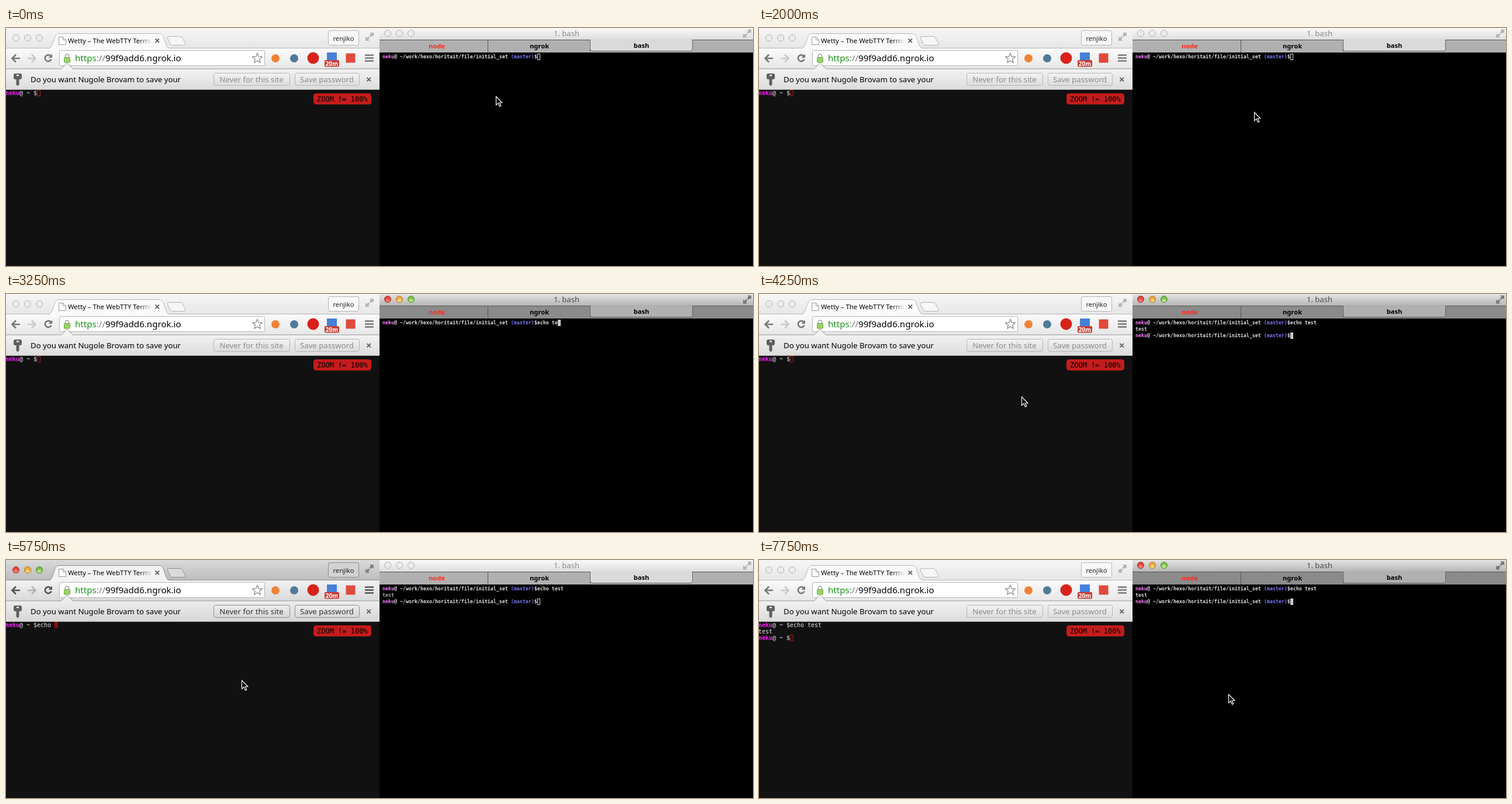
An HTML page that plays this animation: 1278 by 408 pixels, repeating every 8 s.

```html
<!DOCTYPE html>
<html lang="en">
<head>
<meta charset="utf-8">
<title>Shared terminal</title>
<style>
html, body { margin: 0; width: 100%; height: 100%; overflow: hidden; background: #000; }
svg { display: block; width: 100%; height: 100%; }
text { font-family: "Noto Sans", "Open Sans", sans-serif; white-space: pre; }
.mono { font-family: "DejaVu Sans Mono", monospace; }
.mid { text-anchor: middle; }
.tab { font-size: 11.2px; font-weight: 700; text-anchor: middle; }
.ask { font-size: 13.2px; font-weight: 500; }

#web { --s1: #f6f6f6; --s2: #e6e6e6; --b1: #fafafa; --b2: #e7e7e7; --i1: #f2f2f2; --i2: #dcdcdc;
  --ink: #8b8b8b; --icon: #777; --idle: #c9c9c9; --edge: #b5b5b5; --full: #b4b4b4; --name: #f7f7f7; }
#web.on { --s1: #dadada; --s2: #bcbcbc; --b1: #f2f2f2; --b2: #d9d9d9; --i1: #ededed; --i2: #d6d6d6;
  --ink: #333; --icon: #505050; --idle: #b4b4b4; --edge: #8e8e8e; --full: #808080; --name: #d2d2d2; }
#term { --s1: #f8f8f8; --s2: #dedede; --bar: #b0b0b0; --act: #dadada; --ink: #8a8a8a; --full: #b4b4b4; --out: #aaa; }
#term.on { --s1: #e4e4e4; --s2: #b5b5b5; --bar: #8b8b8b; --act: #b0b0b0; --ink: #484848; --full: #777; --out: #d4d4d4; }

.hi { stop-color: var(--s1); } .lo { stop-color: var(--s2); }
.bhi { stop-color: var(--b1); } .blo { stop-color: var(--b2); }
.ihi { stop-color: var(--i1); } .ilo { stop-color: var(--i2); }
.light { fill: #ececec; stroke: #b0b0b0; }
.on .red { fill: url(#gr); stroke: #a8342f; }
.on .amber { fill: url(#ga); stroke: #ad7a25; }
.on .green { fill: url(#gg); stroke: #52902f; }
.full { fill: var(--full); }
.btn { fill: url(#info); stroke: var(--edge); }
.line { fill: none; stroke: var(--icon); stroke-width: 2.6; }
#webText { font-size: 9.967px; fill: #e6e6e6; }
#termText { font-size: 8.305px; font-weight: 700; fill: #e0e0e0; }
</style>
</head>
<body>
<svg viewBox="0 0 1278 408" preserveAspectRatio="none">
<defs>
  <radialGradient id="gr" cy=".75"><stop stop-color="#ff8f86"/><stop offset="1" stop-color="#de4139"/></radialGradient>
  <radialGradient id="ga" cy=".75"><stop stop-color="#ffe488"/><stop offset="1" stop-color="#e9a63a"/></radialGradient>
  <radialGradient id="gg" cy=".75"><stop stop-color="#d2f59a"/><stop offset="1" stop-color="#79b94a"/></radialGradient>
  <path id="expand" d="M14 0V7L11.700 4.700 9 7.400 6.600 5 9.300 2.300 7 0ZM0 14V7L2.300 9.300 5 6.600 7.400 9 4.700 11.700 7 14Z"/>
  <clipPath id="tabClip"><rect x="100" y="10" width="149" height="25"/></clipPath>
</defs>

<g id="web">
  <defs>
    <linearGradient id="strip" x2="0" y2="1"><stop class="hi"/><stop class="lo" offset="1"/></linearGradient>
    <linearGradient id="bar" x2="0" y2="1"><stop class="bhi"/><stop class="blo" offset="1"/></linearGradient>
    <linearGradient id="info" x2="0" y2="1"><stop class="ihi"/><stop class="ilo" offset="1"/></linearGradient>
    <linearGradient id="fade"><stop class="bhi" stop-opacity="0"/><stop class="bhi" offset="1"/></linearGradient>
  </defs>
  <rect width="639" height="408" fill="#111"/>
  <rect width="639" height="35" fill="url(#strip)"/>
  <rect y="35" width="639" height="35" fill="url(#bar)"/>
  <path d="M0 34.500H73C78 34 79 29 84 15Q86 9.500 91 9.500H262Q267 9.500 269 15C274 29 275 34 280 34.500H639" fill="none" stroke="var(--edge)"/>
  <path d="M73 36C78 35 80 29 84.500 15Q86.500 10 91 10H262Q266.500 10 268.500 15C273 29 275 35 280 36Z" style="fill:var(--b1)"/>
  <path d="M278 14.500H298Q301 14.500 302 17L307 27Q308 29.500 305 29.500H285Q282 29.500 281 27L276 17Q275.500 14.500 278 14.500Z" style="fill:var(--s1);stroke:var(--edge)"/>
  <g class="light"><circle class="red" cx="17" cy="17" r="5.500"/><circle class="amber" cx="37" cy="17" r="5.500"/><circle class="green" cx="57" cy="17" r="5.500"/></g>
  <path d="M90.500 15.500H97.500L102.500 20.500V28.500H90.500ZM97.500 15.500V20.500H102.500" fill="#fff" stroke="#999"/>
  <text x="106" y="26" font-size="11.400" font-weight="500" clip-path="url(#tabClip)">Wetty – The WebTTY Terminal</text>
  <rect x="227" y="12" width="23" height="22" fill="url(#fade)"/>
  <path d="M255.500 18.500L262 25M262 18.500L255.500 25" stroke="#666" stroke-width="1.800"/>
  <rect x="551.500" y="4.500" width="52" height="25" rx="2.500" style="fill:var(--name);stroke:var(--edge)"/>
  <text class="mid" x="577.500" y="22" font-size="11.200" fill="#222">renjiko</text>
  <use href="#expand" class="full" x="615" y="8"/>

  <path class="line" d="M24 52H11M17 45.500L10.500 52 17 58.500"/>
  <path class="line" d="M37 52H50M44 45.500L50.500 52 44 58.500" style="stroke:var(--idle)"/>
  <path class="line" d="M76.500 48A5.500 5.500 0 1 0 77.500 53.500"/>
  <path d="M79 44.500V51H72.500Z" style="fill:var(--icon)"/>
  <rect x="91.500" y="38.500" width="351" height="26" rx="2" fill="#fff" stroke="#b5b5b5"/>
  <path d="M101.500 52V48.500A3 3.500 0 0 1 107.500 48.500V52" fill="none" stroke="#a5a5a5" stroke-width="1.700"/>
  <rect x="99.500" y="50.500" width="10" height="8.500" rx="1" fill="#9bd36b" stroke="#67a53b"/>
  <text x="118" y="57" font-size="15.100"><tspan fill="#169316">https</tspan><tspan fill="#777">://</tspan>99f9add6.ngrok.io</text>
  <path id="star" fill="#fff" stroke="#888" stroke-width="1.200"/>
  <circle cx="461" cy="52" r="7" fill="#ef8235"/>
  <circle cx="493" cy="52" r="7" fill="#507b98"/>
  <circle cx="525.500" cy="51.500" r="10" fill="#d8221a"/>
  <rect x="549" y="42" width="17" height="17" fill="#4680d8"/>
  <rect x="545" y="55" width="25" height="11.500" rx="2" fill="#c93f35"/>
  <text class="mid" x="557.500" y="64.500" font-size="10" font-weight="700" fill="#fff">20m</text>
  <rect x="581.500" y="43.500" width="16" height="16" fill="#df4a3d"/>
  <path class="line" d="M614 46.500H629M614 51.500H629M614 56.500H629"/>

  <rect y="70" width="639" height="36" fill="url(#info)"/>
  <path d="M94 71L104.500 60.500 115 71Z" style="fill:var(--i1)"/>
  <path d="M0 70H94.500L104.500 60 114.500 70H639" fill="none" stroke="#969696"/>
  <path d="M0 105.500H639" stroke="#b4b4b4"/>
  <path d="M16 78H24Q27 78 27 81V85Q27 88 24 88H22.500V97L20 99.500 17.500 97V88H16Q13 88 13 85V81Q13 78 16 78ZM18 80V82.500H22V80Z" fill="#5f5f5f" fill-rule="evenodd"/>
  <text class="ask" x="42" y="93">Do you want Nugole Brovam to save your</text>
  <rect class="btn" x="355.500" y="77.500" width="130" height="21" rx="3"/>
  <rect class="btn" x="494.500" y="77.500" width="110" height="21" rx="3"/>
  <g class="ask mid" style="fill:var(--ink)"><text x="420" y="93">Never for this site</text><text x="549" y="93">Save password</text></g>
  <path d="M617.500 85L624 91.500M624 85L617.500 91.500" stroke="#666" stroke-width="1.800"/>

  <g id="webText" class="mono"></g>
  <rect id="webCaret" width="5" height="10"/>
  <rect x="526" y="112" width="99" height="19" rx="4.500" fill="#c41c1c"/>
  <text class="mono" x="532" y="125.500" font-size="12">ZOOM != 100%</text>
</g>

<g id="term">
  <defs><linearGradient id="cap" x2="0" y2="1"><stop class="hi"/><stop class="lo" offset="1"/></linearGradient></defs>
  <rect x="639" width="639" height="408"/>
  <rect x="639" width="639" height="20" fill="url(#cap)"/>
  <rect x="639" y="20" width="639" height="22" style="fill:var(--bar)"/>
  <path d="M639 20.500H1000M1174 20.500H1278M824.500 20V42M999.500 20V40" stroke="#555"/>
  <path d="M1000 20H1174.500V36Q1174.500 39.500 1171 39.500H1003Q999.500 39.500 999.500 36V20" style="fill:var(--act)" stroke="#666"/>
  <rect x="1000" y="19" width="174" height="2" style="fill:var(--act)"/>
  <g class="light"><circle class="red" cx="653" cy="9" r="5.500"/><circle class="amber" cx="673" cy="9" r="5.500"/><circle class="green" cx="693" cy="9" r="5.500"/></g>
  <text class="mid" x="959" y="14" font-size="13" style="fill:var(--ink)">1. bash</text>
  <use href="#expand" class="full" x="1261" y="2.500"/>
  <text class="tab" x="737" y="35" fill="#ff2a1c">node</text>
  <text class="tab" x="912.500" y="35">ngrok</text>
  <text class="tab" x="1087" y="34">bash</text>
  <g id="termText" class="mono"></g>
  <rect id="termCaret" width="4" height="10"/>
</g>

<path id="mouse" d="M0.500 0.500V15L4 11.800 6.500 17.500 8.800 16.500 6.400 11H10.800Z" fill="#000" stroke="#fff" stroke-width="1.200"/>
</svg>
<script>
const $ = id => document.getElementById(id);
const LOOP = 8000, STEP = 250, COMMAND = "echo test";

// Each track is a list of [start time, ...value]; values hold until the next entry.
const mousePath = [[0, 838, 117], [250, 848, 130], [500, 857, 144], [750, 852, 145], [1000, 847, 144],
  [2500], [4250, 449, 176], [4500, 414, 202], [4750, 403, 206], [7000, 640, 223], [7250, 803, 231], [7500, 803, 230]];
const focus = [[0, ""], [2250, "term"], [4750, "web"], [7500, "term"]];
const termTyping = [[0, 0], [2500, 1], [2750, 3], [3000, 5], [3250, 7], [3500, 9]];
const webTyping = [[0, 0], [5250, 1], [5500, 3], [5750, 5], [6000, 7], [6250, 9]];

const at = (track, t) => track.filter(k => k[0] <= t).pop().slice(1);
const span = (fill, s, bold) => `<tspan fill="${fill}"${bold ? ' font-weight="700"' : ""}>${s}</tspan>`;

const web = {
  name: "web", x: -1, y: 115, cell: 6, cols: 9, typing: webTyping, enter: 6500, out: "#e6e6e6",
  prompt: span("#f41af4", "neku", true) + "@ ~ $", fill: "#8e0a0a", edge: "#a51a1a"
};
const term = {
  name: "term", x: 644, y: 52, cell: 5, cols: 53, typing: termTyping, enter: 3750, out: "var(--out)",
  prompt: span("#fa7dfa", "neku") + "@ ~/work/hexo/horitait/file/initial_set " + span("#7b78f5", "(master)") + "$",
  fill: "#c8c8c8", edge: "#dcdcdc"
};

function drawShell(s, t, active) {
  const done = t >= s.enter;
  const typed = COMMAND.slice(0, at(s.typing, t)[0]);
  const lines = [s.prompt + typed];
  if (done) lines.push(span(s.out, "test"), s.prompt);
  $(s.name + "Text").innerHTML = lines.map((l, i) => `<text class="mono" x="${s.x}" y="${s.y + 11 * i}">${l}</text>`).join("");
  const col = s.cols + (done ? 0 : typed.length);
  const caret = $(s.name + "Caret");
  caret.setAttribute("x", s.x + col * s.cell + 0.5);
  caret.setAttribute("y", s.y - 7.5 + 11 * (lines.length - 1) - (s === web ? 1 : 0));
  caret.setAttribute("fill", active ? s.fill : "none");
  caret.setAttribute("stroke", active ? s.fill : s.edge);
  $(s.name).setAttribute("class", active ? "on" : "");
}

function draw(t) {
  const front = at(focus, t)[0];
  for (const s of [web, term]) drawShell(s, t, s.name === front);
  const [x, y] = at(mousePath, t);
  $("mouse").setAttribute("visibility", x === undefined ? "hidden" : "visible");
  if (x !== undefined) $("mouse").setAttribute("transform", `translate(${x} ${y})`);
}

const points = Array.from({ length: 10 }, (_, i) => {
  const a = (i * 36 - 90) * Math.PI / 180, r = i % 2 ? 3.9 : 8.8;
  return `${(430 + r * Math.cos(a)).toFixed(2)} ${(52 + r * Math.sin(a)).toFixed(2)}`;
});
$("star").setAttribute("d", "M" + points.join("L") + "Z");

const begin = performance.now();
let last = -1;
function tick() {
  const t = Math.floor((performance.now() - begin) % LOOP / STEP) * STEP;
  if (t !== last) draw(last = t);
  requestAnimationFrame(tick);
}
draw(0);
tick();
</script>
</body>
</html>
```
